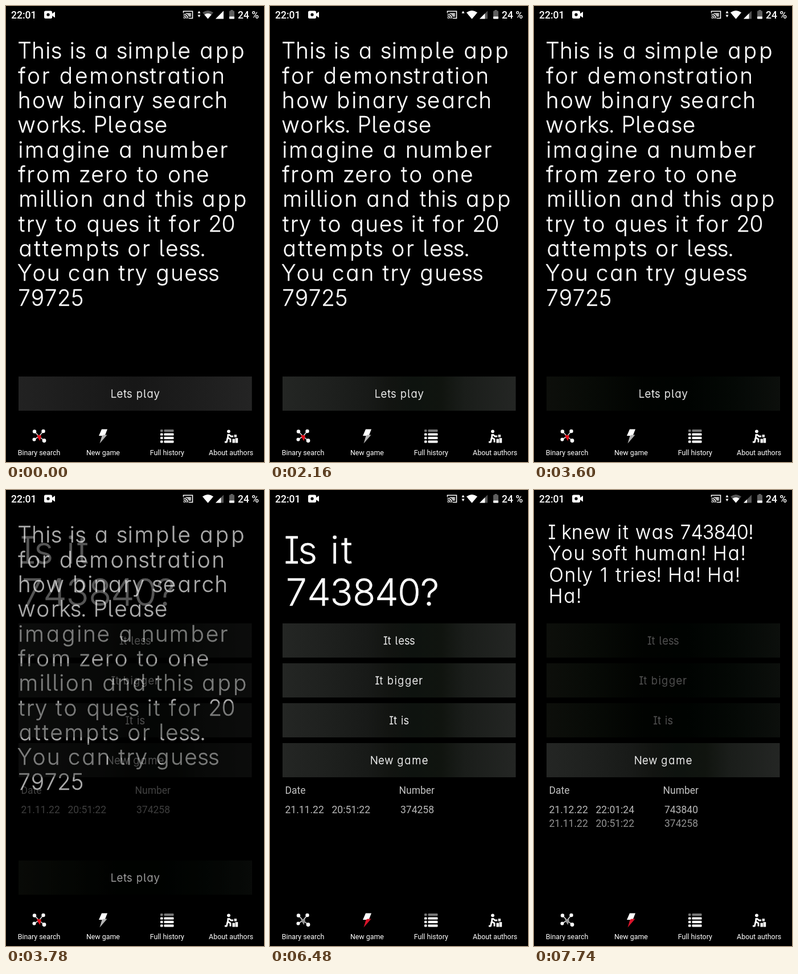
Write an HTML page that moves like this. It is 453 px wide and 800 px high and loops after 8 s.

```html
<!DOCTYPE html>
<html lang="en">
<head>
<meta charset="utf-8">
<title>Binary search game</title>
<style>
html, body { margin: 0; width: 100%; height: 100%; overflow: hidden; background: #000; }
svg { display: block; width: 100vw; height: 100vh; }
text { font-family: Roboto, "Noto Sans", sans-serif; fill: #fff; }
.round {
  font-family: Inter, Lato, sans-serif; font-weight: 300; text-anchor: middle;
  font-variant-ligatures: none; font-feature-settings: "cv05", "cv08", "cv11";
  fill: currentColor; stroke: currentColor; stroke-width: .3px; stroke-linejoin: round;
}
.nav { font-size: 12.4px; text-anchor: middle; }
.status { font-size: 17.5px; font-weight: 500; }
.table { font-size: 17.5px; }
</style>
</head>
<body>
<svg id="stage" viewBox="0 0 453 800" xmlns="http://www.w3.org/2000/svg"></svg>
<script>
const LOOP = 8000, STEP = 90;
const stage = document.getElementById("stage");

// Letter advances in em for the wide rounded display type
const ADVANCE = {
  a: .71, b: .71, c: .59, d: .75, e: .63, f: .38, g: .7, h: .61, i: .28, k: .49,
  l: .305, m: .96, n: .63, o: .68, p: .71, q: .71, r: .415, s: .48, t: .365, u: .61,
  w: .8, y: .56, z: .52, T: .62, Y: .63, P: .6, I: .36, N: .75, L: .56, H: .75, O: .82,
  " ": .34, ".": .24, "!": .27, "?": .5, "1": .5
};
const advance = c => ADVANCE[c] || .6;

function round(str, x, y, size, color = "#fff") {
  const xs = [...str].map(c => {
    const w = advance(c) * size, mid = x + w / 2;
    x += w;
    return mid.toFixed(1);
  });
  return `<text class="round" font-size="${size}" y="${y}" x="${xs.join(" ")}" color="${color}">${str}</text>`;
}

function centered(str, y, size, color) {
  const w = [...str].reduce((sum, c) => sum + advance(c) * size, 0);
  return round(str, 226.8 - w / 2, y, size, color);
}

const lines = (list, x, y, lead, size) =>
  list.map((s, i) => round(s, x, y + i * lead, size)).join("");

const label = (str, x, y, cls, fill = "#fff") =>
  `<text class="${cls}" x="${x}" y="${y}" style="fill:${fill}">${str}</text>`;

const rect = (x, y, w, h, fill, rx = 0) =>
  `<rect x="${x}" y="${y}" width="${w}" height="${h}" rx="${rx}" fill="${fill}"/>`;

const path = (d, fill = "#fff", attrs = "") => `<path d="${d}" fill="${fill}" ${attrs}/>`;

const gradient = (id, stops) => `<linearGradient id="${id}">` +
  stops.map(([at, c]) => `<stop offset="${at}" stop-color="${c}"/>`).join("") + "</linearGradient>";

// A dark face lies over the normal one; its opacity is the press amount
function button(str, y, { id = "", dark = 0, ink = "#f4f4f4" } = {}) {
  const face = (fill, attrs = "") =>
    `<rect x="22" y="${y}" width="409.5" height="60" fill="url(#${fill})" ${attrs}/>`;
  return face("normal") + face("pressed", `id="${id}Dark" opacity="${dark}"`) +
    (id === "play" ? face("plain", 'id="plainFace"') : "") +
    centered(str, y + 37.2, 18.5, ink);
}

const row = (date, time, number, y, fill) =>
  label(date, 26.5, y, "table", fill) + label(time, 108.5, y, "table", fill) +
  label(number, 229, y, "table", fill);

const header = label("Date", 26.5, 533, "table", "#c2c2c2") +
  label("Number", 226.5, 533, "table", "#c2c2c2");

const intro = lines([
  "This is a simple app", "for demonstration", "how binary search", "works. Please",
  "imagine a number", "from zero to one", "million and this app", "try to ques it for 20",
  "attempts or less.", "You can try guess", "79725"
], 20.5, 92.4, 43.33, 38.8) + button("Lets play", 650, { id: "play" });

const game = lines(["Is it", "743840?"], 26.5, 128.5, 74.5, 66) +
  button("It less", 234) + button("It bigger", 304) +
  button("It is", 374, { id: "is" }) + button("New game", 444) + header +
  row("21.11.22", "20:51:22", "374258", 567, "#b8b8b8");

const off = { dark: 1, ink: "#545454" };
const result = lines([
  "I knew it was 743840!", "You soft human! Ha!", "Only 1 tries! Ha! Ha!", "Ha!"
], 25.5, 86, 37.4, 33.4) +
  button("It less", 234, off) + button("It bigger", 304, off) +
  button("It is", 374, off) + button("New game", 444) + header +
  row("21.12.22", "22:01:24", "743840", 567, "#b8b8b8") +
  row("21.11.22", "20:51:22", "374258", 591, "#929292");

const fan = "M345 11.5Q354.5 4.5 364 11.5L354.5 22.5Z";
const status = label("22:01", 9, 22, "status") +
  rect(67, 8.5, 14, 13.5, "#fff", 2.5) + path("M80 14L86 10V20.5L80 16.5Z") +
  `<circle cx="74" cy="15.2" r="2.6" fill="#000"/>` +
  path("M311.5 12V9.3H327.5V21.5H321M311.5 20.3a1.8 1.8 0 0 1 1.8 1.8M311.5 17.3a4.8 4.8 0 0 1 4.8 4.8M311.5 14.3a7.8 7.8 0 0 1 7.8 7.8",
    "none", 'stroke="#fff" stroke-width="1.6"') +
  path("M315 12.3H324.8V18.8H321Q319 14 315 13.5Z", "#bbb") +
  path("M336.5 12.8L339 8.5L341.5 12.8Z", "#fff", 'id="up"') +
  path("M336.5 15.5L339 20L341.5 15.5Z", "#fff", 'id="down"') +
  path(fan, "#555") + path("M348.3 15.2Q354.5 10.6 360.7 15.2L354.5 22.5Z") +
  path(fan, "#fff", 'id="wifi"') +
  path("M368 22.5L382 8.5V22.5Z", "#555") + path("", "#fff", 'id="signal"') +
  rect(394.5, 7, 4, 3, "#666") + rect(392, 8.5, 9, 14, "#5e5e5e", 1) +
  rect(392, 18.5, 9, 4, "#fff", .8) + label("24 %", 407, 22, "status");

function nav() {
  const nodes = [[50, 746.5, 3.2], [65.5, 746, 3.2], [49.5, 760.5, 3], [67, 762.5, 3.4]];
  const net = nodes.map(([x, y, r]) =>
    `<path d="M58 755L${x} ${y}" stroke="#ddd" stroke-width="1.6"/>` +
    `<circle cx="${x}" cy="${y}" r="${r}" fill="#fff"/>`).join("") +
    `<path id="hub" d="M54 752.5L62 753.5L61 758L59.5 763L56 757.5Z"/>`;
  const bolt = path("M168 742.5H178L173.5 754H163Z") +
    `<path id="bolt" d="M171 752.5H177.5L164.5 767.5L168.5 754Z"/>`;
  const list = [0, 1, 2, 3].map(i => {
    const y = 743 + i * 6.4, fill = i ? "#fff" : "#777";
    return rect(271, y, 4.5, 4.2, fill, 1.2) + rect(277.5, y, 17, 4.2, fill, 1.2);
  }).join("");
  const worker = `<circle cx="391" cy="746.3" r="2.9" fill="#fff"/>` +
    path("M390 751L389.5 757.5L394 760V765.5M389 757.5L387.5 765H384M391 751.5L395 755H399",
      "none", 'stroke="#fff" stroke-width="2.8" stroke-linejoin="round"') +
    rect(400.5, 752, 4.6, 4.6, "#ddd") + rect(397.5, 759.5, 4.4, 7, "#fff") +
    rect(402.6, 758, 4.6, 8.5, "#fff");
  const names = ["Binary search", "New game", "Full history", "About authors"];
  return net + bolt + list + worker +
    names.map((s, i) => label(s, 58 + i * 112.4, 787.5, "nav")).join("");
}

stage.innerHTML = "<defs>" +
  gradient("normal", [[0, "#242624"], [.2, "#1e201e"], [.36, "#181a18"], [.46, "#121411"],
    [.56, "#0e130f"], [.68, "#10140f"], [.78, "#1a1d1a"], [1, "#242624"]]) +
  gradient("pressed", [[0, "#0d0f0b"], [.2, "#070a06"], [.42, "#010301"], [.6, "#000301"],
    [.8, "#040805"], [1, "#0c0f0c"]]) +
  gradient("plain", [[0, "#222"], [.3, "#1b1b1b"], [.5, "#171717"], [.75, "#1d1d1d"], [1, "#242424"]]) +
  `<radialGradient id="touch"><stop offset="0" stop-color="#777"/><stop offset=".72" stop-color="#6a6a6a"/>
   <stop offset=".82" stop-color="#999" stop-opacity=".65"/><stop offset="1" stop-color="#667" stop-opacity="0"/></radialGradient></defs>` +
  rect(0, 0, 453, 800, "#000") +
  `<g id="intro">${intro}</g><g id="game">${game}</g><g id="result">${result}</g>` +
  `<circle id="dot" r="16.5" fill="url(#touch)" opacity=".9"/>` + status + nav();

const el = {};
stage.querySelectorAll("[id]").forEach(n => el[n.id] = n);
const set = (id, name, value) => el[id].setAttribute(name, value);
const show = (id, on) => set(id, "opacity", +on);
const between = (t, a, b) => t >= a && t < b;

// Progress in whole steps, as the screen was recorded
const stepped = (t, start, count) =>
  Math.max(0, Math.min(1, (Math.floor((t - start) / STEP) + 1) / count));

function draw(t) {
  const swap = stepped(t, 3780, 3), done = t >= 7470;
  show("intro", 1 - swap);
  show("game", done ? 0 : swap);
  show("result", done);

  show("plainFace", t < 90);
  show("playDark", stepped(t, 3150, 4));
  show("isDark", stepped(t, 7110, 4));

  const first = between(t, 3150, 3600), second = between(t, 7110, 7470);
  set("dot", "visibility", first || second ? "visible" : "hidden");
  set("dot", "cx", 252.5);
  set("dot", "cy", first ? 680 : 398.5);

  const busy = t < 540 || between(t, 2700, 3780) || t >= 6480;
  show("up", busy || between(t, 2160, 2700));
  show("down", busy);
  show("wifi", between(t, 540, 6840));
  const edge = t < 540 ? 382 : t < 7740 ? 377.5 : 374;
  set("signal", "d", `M368 22.5L${edge} ${390.5 - edge}V22.5Z`);

  set("hub", "fill", swap < .5 ? "#e8101c" : "#999");
  set("bolt", "fill", swap < .5 ? "#b5b5b5" : "#d8142a");
}

const begin = performance.now();
function tick() {
  draw((performance.now() - begin) % LOOP);
  requestAnimationFrame(tick);
}
draw(0);
requestAnimationFrame(tick);
</script>
</body>
</html>
```
